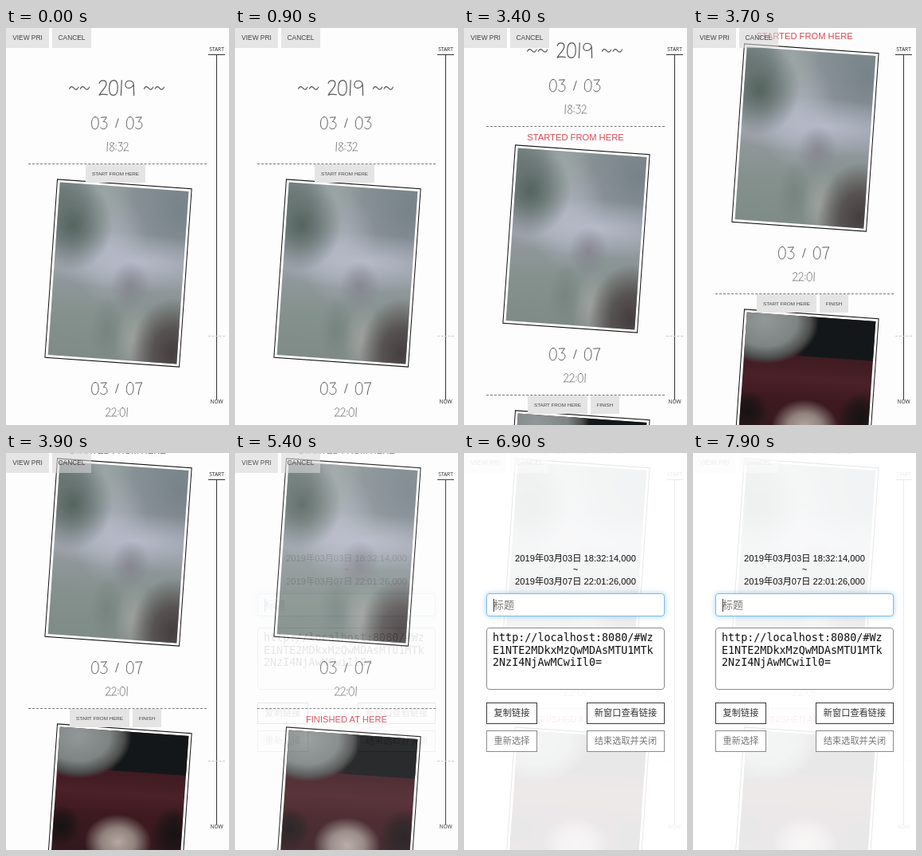
An HTML page that plays this animation: 280 by 498 pixels, repeating every 8000 ms.

```html
<!DOCTYPE html>
<html lang="en">
<head>
<meta charset="utf-8">
<title>Timeline range picker</title>
<style>
html, body { margin: 0; width: 100%; height: 100%; overflow: hidden; background: #fdfdfd; }
body { position: relative; font: 11.2px/14px "Liberation Sans", Arial, "Noto Sans CJK SC", sans-serif; }
body *, body *::before { position: absolute; box-sizing: border-box; white-space: nowrap; }

/* every change is a hard cut on the 8 s clock */
.page, .sec2, .frame, .pick, .note, .modal, .caret { animation: 8s step-end infinite; }

.page { left: 0; top: 0; width: 280px; height: 498px; animation-name: scroll; }
@keyframes scroll {
  0% { margin-top: 0; }
  42.5% { margin-top: -47px; }
  43.75% { margin-top: -105px; }
  45% { margin-top: -148px; }
  46.25% { margin-top: -174px; }
  47.5% { margin-top: -184px; }
  48.75%, 100% { margin-top: -187px; }
}
.sec { left: 0; top: 0; width: 280px; height: 440px; }
.sec2 { top: 333px; }
.sec2, .frame { animation-name: startDrop; }
.sec2 .frame { animation-name: endDrop; }
@keyframes startDrop { 0% { margin-top: 0; } 28.75%, 100% { margin-top: 4px; } }
@keyframes endDrop { 0% { margin-top: 0; } 67.5%, 100% { margin-top: 4px; } }

.hand { left: 0; width: 280px; font-style: normal; }
.hand svg { position: static; display: block; margin: 0 auto; overflow: visible;
  fill: none; stroke: #555; stroke-width: .95; stroke-linecap: round; stroke-linejoin: round; }
.year { top: 65px; }
.day { top: 111px; }
.time { top: 143px; }
.rule { left: 28px; top: 170px; width: 224px; border-top: 1px dashed #777; }

.frame { left: 56px; top: 195px; width: 170px; height: 225px; transform: rotate(4deg);
  border: 1px solid #111; background: #fff; }
.photo { inset: 3px; overflow: hidden; }
.one { background:
  radial-gradient(ellipse at 96% 94%, #453d3f 0, #524a4be0 11%, #6a6a6800 24%),
  radial-gradient(ellipse at 12% 24%, #55645f 0, #5f6d69c0 10%, #7a868400 25%),
  radial-gradient(ellipse at 0 8%, #66746fc0 0, #66746f00 20%),
  radial-gradient(ellipse at 44% 83%, #74827dd0 0, #74827d00 16%),
  radial-gradient(ellipse at 66% 88%, #a9a9a7c0 0, #a9a9a700 17%),
  radial-gradient(ellipse at 60% 57%, #82838dd0 0, #82838d00 18%),
  radial-gradient(ellipse at 36% 4%, #a0aaa8c0 0, #a0aaa800 24%),
  radial-gradient(ellipse 90% 17% at 62% 43%, #b6bac8 0, #b6bac800 100%),
  radial-gradient(ellipse at 42% 36%, #b4b8c4d0 0, #b4b8c400 36%),
  radial-gradient(ellipse at 95% 12%, #707c83c0 0, #707c8300 36%),
  linear-gradient(#8a9497, #959ba2 45%, #85918d 75%, #7f8b87); }
.two { background:
  radial-gradient(ellipse 42% 25% at 14% 4%, #929898 0, #7d8483 60%, #4c4e4d 86%, #3c2a2d00 100%),
  radial-gradient(ellipse 26% 16% at 51% 64%, #b5a7a2 0, #91827e 50%, #5a4042 82%, #45202600 100%),
  radial-gradient(ellipse 16% 12% at 6% 57%, #161314 0, #1d1415c0 55%, #3c1b2000 100%),
  radial-gradient(ellipse 18% 16% at 94% 57%, #161314 0, #1d1415c0 55%, #3c1b2000 100%),
  linear-gradient(90deg, #14171900 36%, #141719 46%) 0 0 / 100% 23% no-repeat,
  linear-gradient(#3c1b20, #401c22 25%, #4a2128 36%, #3e1a20 48%, #32191d 70%, #251a1d); }

.btn { top: 171px; height: 23px; background: #e4e4e4; color: #444;
  font-size: 6.25px; line-height: 23px; text-align: center; }
.sec1 .pick { left: 100px; width: 75px; animation-name: startHide; }
.sec2 .pick { left: 80px; width: 75px; animation-name: endHide; }
.sec2 .end { left: 159px; width: 36px; }
.note { left: 0; top: 177px; width: 280px; text-align: center; color: #d84855; }
.sec1 .note { animation-name: startShow; }
.sec2 .note { animation-name: endShow; }
@keyframes startHide { 0% { visibility: visible; } 28.75%, 100% { visibility: hidden; } }
@keyframes startShow { 0% { visibility: hidden; } 28.75%, 100% { visibility: visible; } }
@keyframes endHide { 0% { visibility: visible; } 67.5%, 100% { visibility: hidden; } }
@keyframes endShow { 0% { visibility: hidden; } 67.5%, 100% { visibility: visible; } }

.tool { top: 0; height: 25px; background: rgba(213, 213, 213, .6); color: #444;
  font-size: 8.4px; line-height: 25px; text-align: center; }

.axis { left: 254px; top: 0; width: 21px; height: 498px; color: #222;
  font: 6.6px/8px "Open Sans", "Noto Sans", sans-serif; text-align: center; }
.axis span { left: -6px; width: 33px; }
.axis .cap { top: 33px; width: 21px; height: 1px; background: #333; }
.axis .line { left: 10px; top: 33px; width: 1px; height: 433px; background: #333; }
.axis .mark { top: 386px; width: 21px; border-top: 1px dashed #ccc; }

.modal { inset: 0; background: rgba(255, 255, 255, .9); color: #111; animation-name: fade; }
@keyframes fade {
  0% { opacity: 0; }
  67.5% { opacity: .1; }
  68.75% { opacity: .51; }
  70% { opacity: .8; }
  71.25% { opacity: .94; }
  72.5% { opacity: .99; }
  73.75%, 100% { opacity: 1; }
}
.range { left: 0; width: 280px; text-align: center; }
.box { left: 28px; width: 224px; border: 1px solid #8a8a8a; border-radius: 4px; background: #fff; }
.title { top: 176px; height: 29px; border-color: #7dbce8; box-shadow: 0 0 6px rgba(102, 175, 233, .6);
  font-size: 13px; line-height: 27px; color: #777; padding-left: 8px; }
.caret { left: 8px; top: 6px; width: 1px; height: 16px; background: #333; animation-name: blink; }
@keyframes blink {
  0% { opacity: 1; }
  80% { opacity: 0; }
  86.25% { opacity: 1; }
  92.5% { opacity: 0; }
  98.75%, 100% { opacity: 1; }
}
.link { top: 219px; height: 78px; margin: 0; padding: 4px 7px;
  font: 13.4px/15.7px "DejaVu Sans Mono", monospace; }
.act { height: 27px; border: 1.5px solid #3a3a3a; background: #fff; color: #333;
  line-height: 25px; text-align: center; }
.dim { border-color: #8c8c8c; color: #777; }
</style>
</head>
<body>
<div class="page">
  <div class="sec sec1">
    <i class="hand year" data-size="1.25">~~ 2019 ~~</i>
    <i class="hand day" data-size="1.02">03 / 03</i>
    <i class="hand time" data-size=".74">18:32</i>
    <div class="rule"></div>
    <div class="frame"><div class="photo one"></div></div>
    <div class="btn pick">START FROM HERE</div>
    <div class="note">STARTED FROM HERE</div>
  </div>
  <div class="sec sec2">
    <i class="hand day" data-size="1.02">03 / 07</i>
    <i class="hand time" data-size=".74">22:01</i>
    <div class="rule"></div>
    <div class="frame"><div class="photo two"></div></div>
    <div class="btn pick">START FROM HERE</div>
    <div class="btn pick end">FINISH</div>
    <div class="note">FINISHED AT HERE</div>
  </div>
</div>

<div class="axis">
  <span style="top:23px">START</span>
  <div class="cap"></div>
  <div class="line"></div>
  <div class="mark"></div>
  <span style="top:465px">NOW</span>
</div>

<div class="tool" style="left:0;width:54px">VIEW PRI</div>
<div class="tool" style="left:58px;width:49px">CANCEL</div>

<div class="modal">
  <div class="range" style="top:125px">2019年03月03日 18:32:14,000</div>
  <div class="range" style="top:139px">~</div>
  <div class="range" style="top:154px">2019年03月07日 22:01:26,000</div>
  <div class="box title">标题<div class="caret"></div></div>
  <div class="box link">http://localhost:8080/#Wz<br>E1NTE2MDkxMzQwMDAsMTU1MTk<br>2NzI4NjAwMCwiIl0=</div>
  <div class="act" style="left:28px;top:313px;width:64px">复制链接</div>
  <div class="act" style="left:154px;top:313px;width:98px">新窗口查看链接</div>
  <div class="act dim" style="left:28px;top:348px;width:64px">重新选择</div>
  <div class="act dim" style="left:154px;top:348px;width:98px">结束选取并关闭</div>
</div>

<script>
// Thin handwritten glyphs, 16 units tall: [advance, stroke]
const glyphs = {
  0: [11, "M5 .5C1.5 .5 .5 5 .5 9s1.5 6.5 4 6.5C8 15.5 9 11 9 7.5S8 .5 5 .5z"],
  1: [5, "M2 .5 1.3 15.5"],
  2: [10, "M.5 3.5C1.5 0 7.5-.5 7.5 4 7.5 8 2.5 11 .5 15.3 3 14 6 14.5 8.8 15"],
  3: [10, "M1 1.2 8 .8 4 6.5C10 6 10 14.5 4.5 15.3 2.5 15.5 1 14.5 .5 13.5"],
  7: [10, "M.5 1.2 8.5 .8C6 5 4.5 10 4 15.5"],
  8: [10, "M7.5 2.5C5-.5 1 1 1.5 4 2 7.5 8.5 8 8.3 12 8 16.5 .5 16.5 .7 12 1 8.5 7.5 6.5 7.5 2.5z"],
  9: [11, "M9 4.5C8 0 1-.5 .7 5 .5 9.5 7 9.5 9 4.5L9.3 15.5"],
  "/": [6, "M4.5 2.5 1 13.5"],
  ":": [4, "M1.5 5.5v1M1.3 11.5v1"],
  "~": [11, "M.5 9C1.7 6.3 3.5 6.3 5 8.3S8.3 10.3 9.6 7.3"],
  " ": [8, ""]
};

for (const el of document.querySelectorAll(".hand")) {
  const text = el.textContent, size = +el.dataset.size;
  let x = 0, strokes = "";
  for (const ch of text) {
    const [advance, d] = glyphs[ch];
    strokes += `<path d="${d}" transform="translate(${x})"/>`;
    x += advance;
  }
  el.innerHTML = `<svg role="img" aria-label="${text}" width="${x * size}" height="${16 * size}">
    <g transform="scale(${size})">${strokes}</g></svg>`;
}
</script>
</body>
</html>
```
